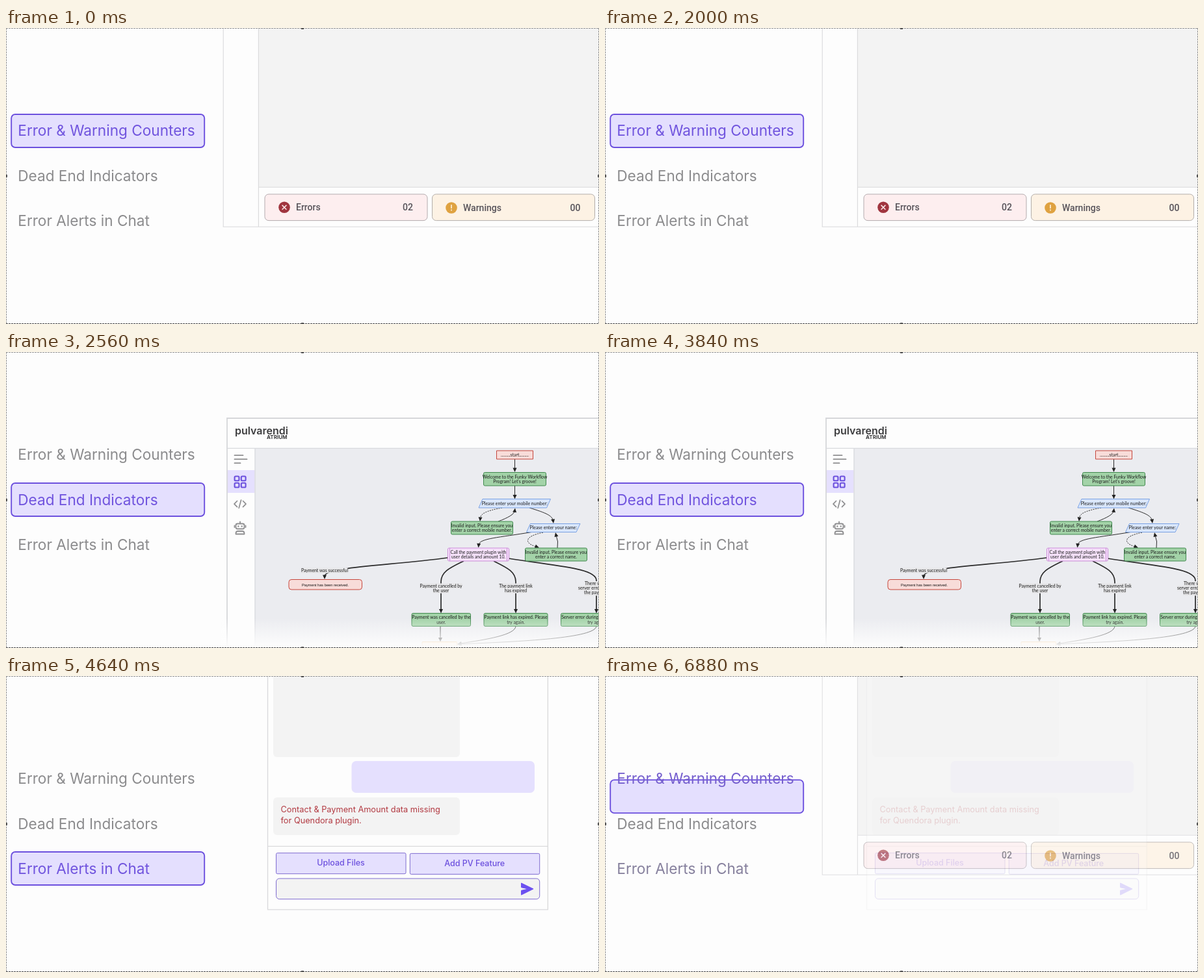
An HTML page with a canvas that plays this animation: 912 by 456 pixels, repeating every 6960 ms.

```html
<!DOCTYPE html>
<html lang="en">
<head>
<meta charset="utf-8">
<title>Error handling overview</title>
<style>
html, body { margin: 0; width: 100%; height: 100%; overflow: hidden; background: #fdfdfd; }
canvas { display: block; width: 912px; height: 456px; }
</style>
</head>
<body>
<canvas id="stage" width="912" height="456"></canvas>
<script>
const W = 912, H = 456, LOOP = 6960, FADE = 300;
const STARTS = [2040, 4340, 6640];
const PAPER = '#fdfdfd', LILAC = '#e5e0fe', PURPLE = '#6c50de', MIST = '#f3f3f3', LINE = '#d9d9db';
const UI = 'Inter, sans-serif', CARD = 'Roboto, sans-serif', FLOW = 'Lato, sans-serif';
const GREEN = ['#a3d3a8', '#41894f'], BLUE = ['#d9e6fb', '#7aa2e4'], RED = ['#f8dcd9', '#c5473d'];

const stage = document.getElementById('stage').getContext('2d');
let g = stage;

function box(x, y, x2, y2, r, fill, stroke, width = 1) {
  g.beginPath();
  g.roundRect(x, y, x2 - x, y2 - y, r);
  if (fill) { g.fillStyle = fill; g.fill(); }
  if (stroke) { g.strokeStyle = stroke; g.lineWidth = width; g.stroke(); }
}

function path(d, stroke, width = 1, fill) {
  const p = new Path2D(d);
  if (fill) { g.fillStyle = fill; g.fill(p); }
  if (stroke) { g.strokeStyle = stroke; g.lineWidth = width; g.stroke(p); }
}

function dot(x, y, r, fill) {
  g.fillStyle = fill;
  g.beginPath();
  g.arc(x, y, r, 0, 7);
  g.fill();
}

function text(s, x, y, font, color, align = 'left') {
  g.font = font;
  g.fillStyle = color;
  g.textAlign = align;
  g.fillText(s, x, y);
}

// Centred lines of flow chart text, y is the first baseline.
function label(lines, x, y, back) {
  lines.forEach((s, i) => {
    const by = y + i * 7.2;
    g.font = '6.85px ' + FLOW;
    if (back) {
      const w = g.measureText(s).width;
      g.fillStyle = '#e6e6e8';
      g.fillRect(x - w / 2, by - 6, w, 8);
    }
    text(s, x, by, '6.85px ' + FLOW, '#1c1c1c', 'center');
  });
}

function node(x, y, x2, y2, [fill, stroke], lines) {
  box(x, y, x2, y2, 2, fill, stroke);
  label(lines, (x + x2) / 2, (y + y2) / 2 - (lines.length - 1) * 3.6 + 2.4);
}

function slanted(x, y, x2, y2, s) {
  path(`M${x + 6} ${y}H${x2}L${x2 - 6} ${y2}H${x}Z`, BLUE[1], 1, BLUE[0]);
  label([s], (x + x2) / 2, (y + y2) / 2 + 2.4);
}

// Curve with an arrow head at (x, y) pointing along the angle in degrees.
function arrow(d, x, y, angle, width = 1, dash = []) {
  g.setLineDash(dash);
  path(d, '#2b2b2b', width);
  g.setLineDash([]);
  g.save();
  g.translate(x, y);
  g.rotate(angle * Math.PI / 180);
  path('M0 0L-6.5 -3V3Z', null, 0, '#222');
  g.restore();
}

function counters() {
  g.fillStyle = PAPER;
  g.fillRect(334, 0, 578, 306);
  g.fillStyle = MIST;
  g.fillRect(389, 0, 523, 245);
  path('M334.2 0V306.2H912M388.4 0V306M388 245.2H912', LINE, 1.1);

  box(398, 256, 648, 296.6, 6, '#fdeeef', '#b3abae');
  dot(428, 276.3, 8.8, '#a0353f');
  path('M424.6 272.9l6.8 6.8M431.4 272.9l-6.8 6.8', '#fbe5e6', 1.6);
  const font = '500 14px ' + CARD, ink = '#57535a';
  text('Errors', 446, 281.3, font, ink);
  text('02', 610, 281.3, font, ink);

  box(655.5, 256, 905.5, 296.6, 6, '#fdf2e4', '#b3aeaa');
  dot(685, 277, 8.8, '#dfa240');
  path('M685 272.3v5.6M685 279.6v1.8', '#fdf0dc', 1.7);
  text('Warnings', 703, 282, font, ink);
  text('00', 867.5, 282, font, ink);
}

function menuIcons() {
  const grey = '#8e8e90';
  g.lineCap = 'round';
  g.lineJoin = 'round';
  path('M351.5 159.2h13M351.5 165.2h19M351.5 171.2h9', grey, 1.8);
  for (const x of [351.6, 361.8])
    for (const y of [191.5, 201.7]) box(x, y, x + 6.8, y + 6.8, 1.6, null, PURPLE, 2.1);
  path('M355.5 229.5l-4.5 4.6 4.5 4.6M364.5 229.5l4.5 4.6-4.5 4.6M361.6 228l-3.4 12.4', grey, 1.7);
  box(353.5, 264.5, 366.5, 272.5, 2.5, null, grey, 1.8);
  path('M360 264v-2.6M351.5 267.5v2.5M368.5 267.5v2.5M353.5 280.5v-1q0-3.5 3.5-3.5h6q3.5 0 3.5 3.5v1Z', grey, 1.8);
  dot(357.3, 268.5, 1.2, grey);
  dot(362.7, 268.5, 1.2, grey);
  g.lineCap = 'butt';
  g.lineJoin = 'miter';
}

function chart() {
  arrow('M782.5 165V182', 782.5, 185, 90);
  arrow('M782.5 206V223', 782.5, 226.5, 90);
  arrow('M763 240C737 245 730 249 729 257', 729, 261, 95, 1, [2, 1.5]);
  arrow('M757 261C773 255 781 250 782.5 245', 783, 240.5, -82);
  arrow('M805 240C831 248 840 252 841.5 260', 842, 264, 82);
  arrow('M808 277.5C758 286 728 287 727 297', 726.5, 301.5, 96);
  arrow('M826 278C797 284 797 294 814 299.5', 820, 301.5, 20, 1, [2, 1.5]);
  arrow('M848 302Q850 292 846 282', 845, 278, -103);
  arrow('M679 317C590 329 492 331 490 345', 490, 350, 90, 1.7);
  arrow('M704 322C684 332 669 338 669 354V398', 669, 402.5, 90, 1.7);
  arrow('M750 322C770 332 784 338 784 354V398', 784, 402.5, 90, 1.7);
  arrow('M773 318C848 330 908 333 908 352V398', 908, 402.5, 90, 1.7);
  arrow('M668 422V442', 668, 446.5, 90);
  arrow('M784 422C784 436 738 443 699 449', 694, 450, 172);
  arrow('M908 422C908 441 790 446 699 450', 694, 450.5, 177);

  box(754.5, 152, 810.5, 165, 0, ...RED);
  label(['.........start.........'], 782.5, 160.6);
  node(734.5, 185.5, 830.5, 206, GREEN, ['Welcome to the Funky Workflow', 'Program! Let\'s groove!']);
  slanted(727, 226.5, 837.5, 240, 'Please enter your mobile number:');
  const bad = 'Invalid input. Please ensure you';
  node(684.5, 261, 779.5, 281, GREEN, [bad, 'enter a correct mobile number.']);
  slanted(800.5, 264.5, 883, 277.5, 'Please enter your name:');
  node(798.5, 302, 893.5, 322, GREEN, [bad, 'enter a correct name.']);
  node(679.5, 302, 773.5, 322, ['#f6e2fb', '#cb8cd8'], ['Call the payment plugin with', 'user details and amount 10.']);
  path('M682.5 302v20M770.5 302v20', '#cb8cd8');

  label(['Payment was successful'], 490, 338.6, true);
  box(435, 350.5, 547.5, 366, 4, ...RED);
  text('Payment has been received.', 491, 360.8, '5.7px "Liberation Sans", sans-serif', '#111', 'center');
  label(['Payment cancelled by', 'the user'], 669, 362.5, true);
  label(['The payment link', 'has expired'], 784, 362.5, true);
  label(['There was a', 'server error during', 'the payment'], 908, 359, true);
  node(624, 402.5, 714.5, 422.5, GREEN, ['Payment was cancelled by the', 'user.']);
  node(735, 402.5, 833, 422.5, GREEN, ['Payment link has expired. Please', 'try again.']);
  node(853.5, 402.5, 962.5, 422.5, GREEN, ['Server error during payment. Please', 'try again.']);
  box(640, 446.5, 693.5, 462, 1, '#fbe6cc', '#e0a050');
}

function flow() {
  g.fillStyle = PAPER;
  g.fillRect(339, 101, 573, 355);
  g.fillStyle = '#ebecf0';
  g.fillRect(383, 148, 529, 308);
  chart();
  g.fillStyle = LILAC;
  g.fillRect(340, 182, 42.5, 35);
  path('M912 102H340V456', '#d6d7da', 1.8);
  path('M340 148.3H912M383 148V456', '#d8d9dd', 1.3);
  text('pulvarendi', 352, 127, '600 16px ' + UI, '#3c3c3e');
  text('ATRIUM', 432.5, 133.5, '700 8px ' + UI, '#3c3c3e', 'right');
  menuIcons();
  const fog = g.createLinearGradient(0, 410, 0, 455);
  fog.addColorStop(0, 'rgba(253,253,253,0)');
  fog.addColorStop(0.8, 'rgba(253,253,253,.8)');
  fog.addColorStop(1, 'rgba(253,253,253,1)');
  g.fillStyle = fog;
  g.fillRect(330, 410, 582, 46);
}

function chat() {
  box(402.5, -10, 833.3, 359.8, 0, PAPER, LINE, 1.3);
  path('M402 262.3H833', LINE, 1.3);
  box(411, -10, 698, 125, 6, MIST);
  box(531.5, 131, 813, 180, 7, LILAC);
  box(411, 187, 698, 245, 6, MIST);
  const note = '12.75px ' + UI;
  text('Contact & Payment Amount data missing', 422.5, 209.6, note, '#b23a42');
  text('for Quendora plugin.', 422.5, 227.4, note, '#b23a42');

  const edge = '#7f6cd0', btn = '500 12.5px ' + UI;
  box(415.5, 272.7, 615, 304.7, 2, LILAC, edge);
  text('Upload Files', 515, 292.2, btn, PURPLE, 'center');
  box(621.3, 273.4, 820.7, 305.4, 2, LILAC, edge);
  text('Add PV Feature', 720.7, 293, btn, PURPLE, 'center');
  box(415.5, 312, 820.7, 343.7, 5, MIST, edge);
  g.lineJoin = 'round';
  path('M792.5 319L811 328 792.5 337.2V330.4L803.5 328 792.5 325.7Z', '#6c50f0', 1, '#6c50f0');
  g.lineJoin = 'miter';
}

function layer(draw) {
  const c = document.createElement('canvas');
  c.width = W;
  c.height = H;
  g = c.getContext('2d');
  draw();
  g = stage;
  return c;
}

const panels = [counters, flow, chat].map(layer);
const items = ['Error & Warning Counters', 'Dead End Indicators', 'Error Alerts in Chat'];

function mix(u) {
  const a = [139, 139, 141], b = [112, 84, 222];
  return `rgb(${a.map((v, i) => Math.round(v + (b[i] - v) * u))})`;
}

function frameEdge() {
  g.setLineDash([3, 1]);
  path('M0 .5H912M.5 0V456M911.5 0V456', '#959595');
  path('M0 455.5H912', '#4a4a4a');
  g.setLineDash([]);
  g.fillStyle = '#555';
  g.fillRect(454, 0, 4, 2);
  g.fillRect(454, 454, 4, 2);
  g.fillRect(0, 226, 2, 4);
  g.fillRect(910, 226, 2, 4);
}

function draw(t) {
  let from = 0, to = 0, u = 1;
  STARTS.forEach((s, i) => {
    if (t >= s) {
      from = i;
      to = (i + 1) % 3;
      u = Math.min(1, (t - s) / FADE);
    }
  });

  g.globalAlpha = 1;
  g.fillStyle = PAPER;
  g.fillRect(0, 0, W, H);

  g.globalAlpha = u;
  g.drawImage(panels[to], 0, 0);
  if (u < 1) {
    g.globalAlpha = 1 - u;
    g.drawImage(panels[from], 0, 0);
  }
  g.globalAlpha = 1;

  const y = 133 + 69 * (from + (to - from) * u);
  box(8.2, y, 305.2, y + 51, 6, '#e4dffe', PURPLE, 1.9);
  items.forEach((s, i) => {
    const on = i === to ? u : i === from ? 1 - u : 0;
    text(s, 18.3, 166.3 + i * 69.3, '22.6px ' + UI, mix(on));
  });
  frameEdge();
}

const begin = performance.now();
function tick() {
  draw((performance.now() - begin) % LOOP);
  requestAnimationFrame(tick);
}
tick();
</script>
</body>
</html>
```
